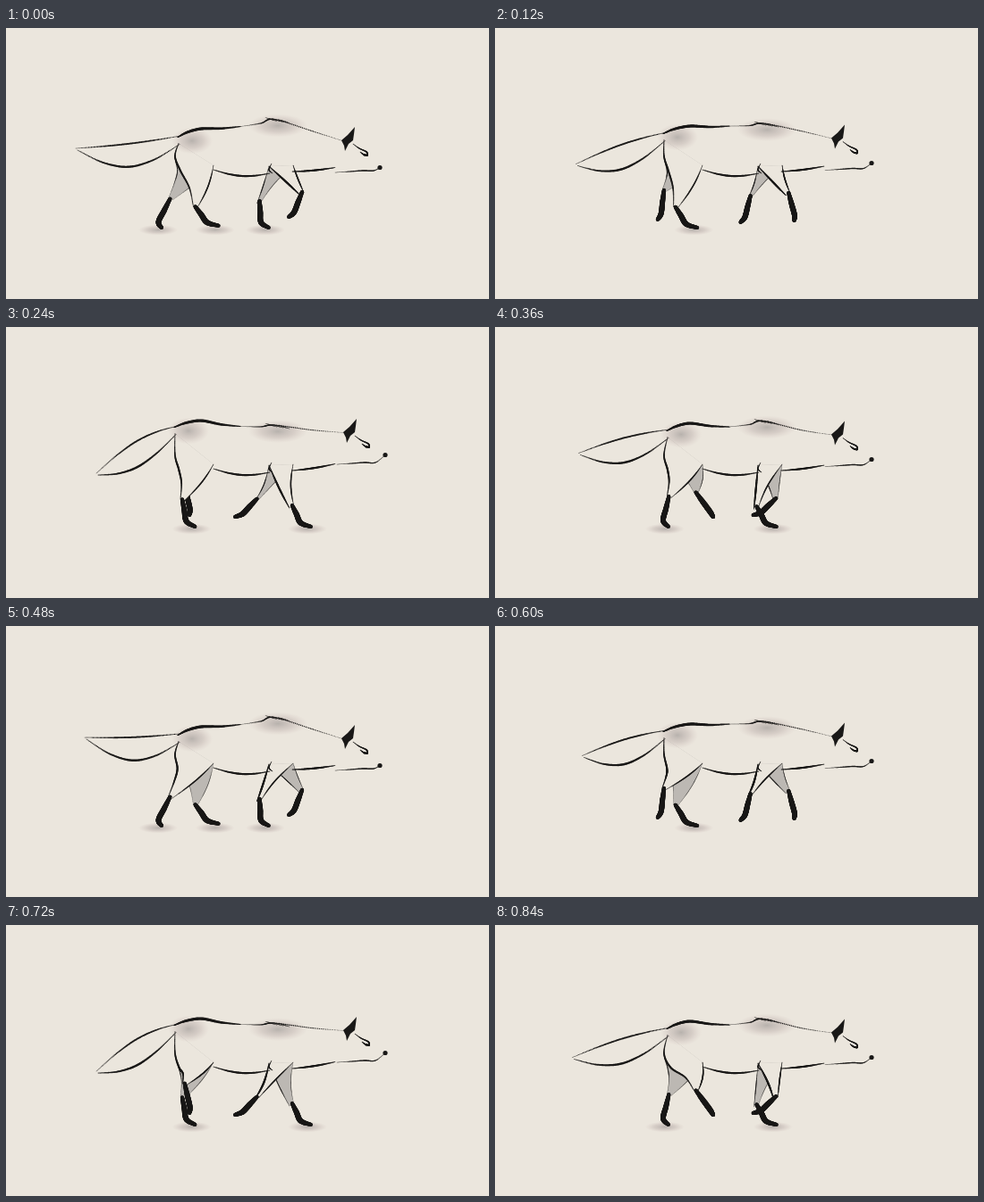
Write an HTML page with a canvas that moves like this. It is 540 by 304 pixels and loops after 960 ms.

```html
<!DOCTYPE html>
<html lang="en">
<head>
<meta charset="utf-8">
<title>Ink fox walking</title>
<style>
  html, body { margin: 0; width: 100%; height: 100%; overflow: hidden; background: #ebe6dd; }
  canvas { display: block; }
</style>
</head>
<body>
<canvas id="stage" width="540" height="304"></canvas>
<script>
const ctx = document.getElementById('stage').getContext('2d');
const INK = '#191817', PAPER = '#ebe6dd', SHADE = '#bcb8b3';
const STEP = 120, POSES = 8, GROUND = 224;
const { PI, sin, cos, min, max, floor } = Math;

const mod = (a, n) => ((a % n) + n) % n;
const mix = (a, b, t) => a + (b - a) * t;
const lerp = (p, q, t) => [mix(p[0], q[0], t), mix(p[1], q[1], t)];
const add = ([x, y], dx, dy) => [x + dx, y + dy];

// A line from p to q, bent by (dx, dy) in the middle.
const bow = (p, q, dx, dy) => [0, 0.25, 0.5, 0.75, 1].map(t =>
  add(lerp(p, q, t), dx * sin(PI * t), dy * sin(PI * t)));

function smooth(points) {
  const last = points.length - 1, steps = last * 24;
  const at = k => points[max(0, min(last, k))];
  return Array.from({ length: steps + 1 }, (_, n) => {
    const i = min(last - 1, floor(n / 24)), u = n / 24 - i;
    const [a, b, c, d] = [at(i - 1), at(i), at(i + 1), at(i + 2)];
    return [0, 1].map(k => b[k] + u / 2 * (c[k] - a[k]
      + u * (2 * a[k] - 5 * b[k] + 4 * c[k] - d[k] + u * (3 * (b[k] - c[k]) + d[k] - a[k]))));
  });
}

function dot([x, y], r) {
  ctx.beginPath();
  ctx.arc(x, y, r, 0, 2 * PI);
  ctx.fill();
}

// thin: share of the width left at both ends
function brush(points, width, thin = 0.35) {
  ctx.fillStyle = INK;
  const path = smooth(points);
  path.forEach((p, i) =>
    dot(p, width / 2 * mix(thin, 1, sin(PI * i / (path.length - 1)))));
}

function fill(points, color) {
  ctx.beginPath();
  points.forEach(p => ctx.lineTo(...p));
  ctx.fillStyle = color;
  ctx.fill();
}

function wash([x, y], rx, ry) {
  const soft = ctx.createRadialGradient(0, 0, 0, 0, 0, 1);
  soft.addColorStop(0, 'rgba(120,114,114,.45)');
  soft.addColorStop(0.55, 'rgba(160,142,142,.28)');
  soft.addColorStop(1, 'rgba(190,165,165,0)');
  ctx.save();
  ctx.translate(x, y);
  ctx.scale(rx, ry);
  ctx.fillStyle = soft;
  dot([0, 0], 1);
  ctx.restore();
}

// The toe slides back from `reach` to `push` in stance, then swings forward, lifted.
const HIND = {
  start: 7, stance: 5, reach: 244, push: 174, liftAt: 4.2, liftFor: 3.9,
  slide: k => k ** 1.5, swing: k => k * k,
  foot: 34, tilt: -0.3, turn: 0.6, turnAt: 0.3
};
const FRONT = {
  start: 2, stance: 4, reach: 341, push: 256, liftAt: 4.4, liftFor: 5.5,
  slide: k => k ** 0.85, swing: k => sin(k * PI / 2),
  foot: 32, tilt: 0.08, turn: 0.9, turnAt: 2.6
};

function footPose(gait, phase) {
  const k = mod(phase - gait.start, POSES) / gait.stance;
  const swing = (k - 1) * gait.stance / (POSES - gait.stance);
  const x = k < 1 ? mix(gait.reach, gait.push, gait.slide(k))
                  : mix(gait.push, gait.reach, gait.swing(swing));
  const air = min(1, mod(phase - gait.liftAt, POSES) / gait.liftFor);
  const lift = 13 * max(0, sin(PI * air)) ** 0.7;
  const angle = gait.tilt - gait.turn * cos((phase - gait.turnAt) * PI / 4);
  const toe = [x, GROUND - lift];
  const ankle = add(toe, gait.foot * sin(angle), -gait.foot * cos(angle));
  const heel = add(lerp(ankle, toe, 0.74), lift < 4 ? -6 : 2, 2);
  return { toe, ankle, lift, points: [ankle, lerp(ankle, heel, 0.5), heel, toe] };
}

function hindLeg(phase, rump) {
  const foot = footPose(HIND, phase), { ankle } = foot;
  const thigh = [193 + (ankle[0] - 195) * 0.12, 160];
  const end = add(ankle, -2, 0);
  return {
    foot,
    rear: [add(rump, 1, 7), [189, 144], thigh, add(lerp(thigh, end, 0.55), 2, -3), end],
    front: bow([232, 154], add(ankle, 2, 2), 3, 0)
  };
}

function frontLeg(phase) {
  const foot = footPose(FRONT, phase), { ankle, lift } = foot;
  return {
    foot,
    rear: bow([294, 155], add(ankle, -3, 3), lift * 0.2, 2),
    front: bow([321, 154], add(ankle, 2, 1), lift * 0.2 - 3, 0)
  };
}

function drawLeg({ rear, front, foot }, color, weight) {
  fill([...smooth(rear), ...smooth(front).reverse()], color);
  brush(rear, 2.2 * weight);
  brush(front, 1.6 * weight);
  brush(foot.points, 6, 0.65);
}

function draw(pose) {
  // The body repeats with every step, so twice in a full stride.
  const c = cos(pose * PI / 2), s = sin(pose * PI / 2), sway = cos(pose * PI / 4);
  const head = (x, y) => [x - c, y + 4 * c + 1.5 * s];

  const rump = [190 + 2 * c - 2 * s, 117.5 + 5 * c + s];
  const croup = [218, 109 + 4 * c + s];
  const loin = [262, 111 - 0.5 * c - s];
  const shoulder = [300, 106.3 - 3.8 * c + 0.8 * s];
  const tailTip = [92 - 9 * c + 2 * s - 5 * sway, 147 - 17 * c + 2 * s + 5 * sway];
  const nose = add(head(421, 150), -2 * c, 2.5 * c);

  ctx.fillStyle = PAPER;
  ctx.fillRect(0, 0, 540, 304);

  const near = [hindLeg(pose, rump), frontLeg(pose)];
  const far = [hindLeg(pose + 4, rump), frontLeg(pose + 4)];
  for (const { foot } of [...near, ...far]) {
    if (foot.lift < 4) wash([foot.toe[0] - 4, 226.5], 22, 6);
  }
  // Near legs cover the far ones, which leaves only a wedge of shade visible.
  far.forEach(leg => drawLeg(leg, SHADE, 0.5));
  near.forEach(leg => drawLeg(leg, PAPER, 1));

  wash(add(rump, 16, 4), 23, 15);
  wash(add(shoulder, 4, 7), 33, 13);

  // tail
  brush(bow(tailTip, add(rump, 6, -2), 0, 6 * c - 4), 2);
  brush(bow(add(tailTip, 2, 2), add(rump, 2, 8), 0, 18 + 4 * c), 2.4);

  // back, scruff and belly
  brush([rump, lerp(rump, add(croup, 0, -4), 0.4), croup, add(lerp(croup, loin, 0.5), 0, 1), loin], 3.2);
  brush([loin, lerp(loin, add(shoulder, 0, 2), 0.6), shoulder, [342, 115.5], head(377, 122.5)], 1.6);
  for (let i = 0; i < 3; i++) {
    const hair = add(shoulder, 7 * i - 10, i - 2);
    brush([hair, add(hair, 13, 4)], 1.1);
  }
  brush(bow([232, 159], [295, 163], 0, 5), 2.2);
  brush([[297, 152], [294, 159], [298, 163]], 1.2);
  brush(bow([320, 161], [368, 155 + 1.5 * c], 0, 1), 2.1);

  // head
  brush([head(389, 126), head(396, 131), head(404, 135), head(405, 139), head(401, 139)], 1.5);
  brush([head(397, 135), head(401, 138), head(404, 138)], 1.4);
  brush([nose, head(412, 156), head(400, 156), head(385, 157), head(369, 158)], 1.4);
  fill([head(376, 122), head(383, 116), head(391, 107), head(390, 115),
        head(389, 122), head(384, 126), head(380, 134), head(379, 128)], INK);
  ctx.fillStyle = INK;
  dot(nose, 2.6);
}

let shown = -1;
function tick() {
  const pose = floor(performance.now() / STEP) % POSES;
  if (pose !== shown) draw(shown = pose);
  requestAnimationFrame(tick);
}
tick();
</script>
</body>
</html>
```
